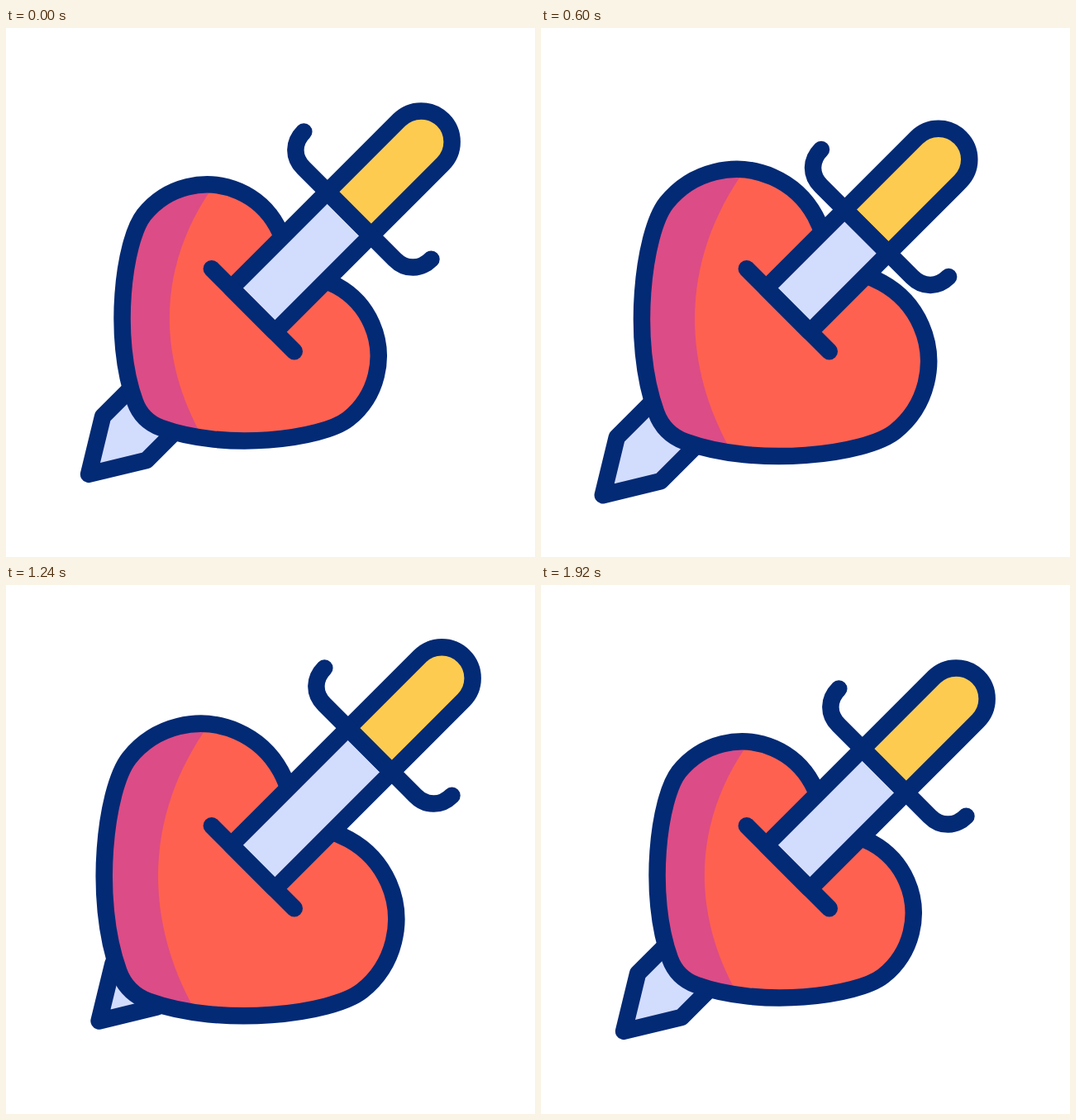
These frames come from a looping animation (640x640 px, 2000 ms). An HTML page:

```html
<!DOCTYPE html>
<html lang="en">
<head>
<meta charset="utf-8">
<title>Heart and dagger</title>
<style>
  html, body { margin: 0; height: 100%; overflow: hidden; background: #fff; }
  svg { display: block; width: 100%; height: 100%; }
  .line { fill: none; stroke: #032a75; stroke-width: 20.5; stroke-linecap: round; stroke-linejoin: round; }
  .steel { fill: #d2dcfd; }
  .gold { fill: #fdcb50; }
</style>
</head>
<body>
<svg viewBox="0 0 640 640">
  <defs>
    <path id="shape" d="M26.5 0A97 97 0 0 0 -41.7 -174.7C-82 -169.7 -174.7 -96.9 -209.3 -22.6
      Q-219.9 0 -209.3 22.6C-174.7 96.9 -82 169.7 -41.7 174.7A97 97 0 0 0 26.5 0Z"/>
    <clipPath id="inside"><use href="#shape"/></clipPath>
  </defs>
  <!-- x runs along the dagger, everything is symmetric about y = 0 -->
  <g transform="translate(320 320) rotate(-45)">
    <path id="tip" class="line steel" d="M-60 -37.4H-249.6L-311 0L-249.6 37.4H-60"/>
    <g id="heart">
      <use href="#shape" fill="#dc4c86"/>
      <path clip-path="url(#inside)" fill="#ff6150"
        d="M43.8 -140C-77.8 -120 -152 -38.9 -181 62.2V200H100V-140Z"/>
      <use id="rim" href="#shape" class="line"/>
    </g>
    <path id="blade" class="line steel"/>
    <g id="hilt">
      <path class="line gold" d="M134.7 -37.4H257.7A37.4 37.4 0 0 1 257.7 37.4H134.7Z"/>
      <path class="line" d="M166 -109C148 -109 134.7 -97 134.7 -78V78C134.7 97 148 109 166 109"/>
    </g>
    <path class="line" d="M-30 -70.7V70.7"/>
  </g>
</svg>
<script>
const $ = id => document.getElementById(id);

// cubic-bezier(.5, 0, .5, 1), solved by bisection
function ease(x) {
  let lo = 0, hi = 1;
  for (let i = 0; i < 24; i++) {
    const s = (lo + hi) / 2;
    if (1.5 * s * (1 - s) + s ** 3 < x) lo = s; else hi = s;
  }
  return lo * lo * (3 - 2 * lo);
}

// Eases through the values, one every `step` ms, holding the last one.
function track(t, step, values) {
  const last = values.length - 1;
  const p = Math.min(Math.max(t / step, 0), last);
  const i = Math.min(Math.floor(p), last - 1);
  return values[i] + (values[i + 1] - values[i]) * ease(p - i);
}

const slide = (id, d) => $(id).setAttribute('transform', `translate(${d})`);

function draw(now) {
  const t = Math.floor(now % 2000 / 40) * 40 - 80; // 25 pictures a second, after a short rest
  const scale = track(t, 400, [1, 1.142, 1, 1.142, 1]);
  const pull = track(t, 600, [0, -31, 35.8, 0]);

  $('heart').setAttribute('transform', `translate(-33.2) scale(${scale}) translate(33.2)`);
  $('rim').style.strokeWidth = 20.5 / scale; // the line keeps its weight
  slide('tip', track(t, 600, [0, -36.8, 18, 0]));
  slide('hilt', pull);
  $('blade').setAttribute('d', `M-30 -37.4H${134.7 + pull}V37.4H-30Z`);
}

const start = performance.now();
function loop() {
  draw(performance.now() - start);
  requestAnimationFrame(loop);
}
loop();
</script>
</body>
</html>
```
